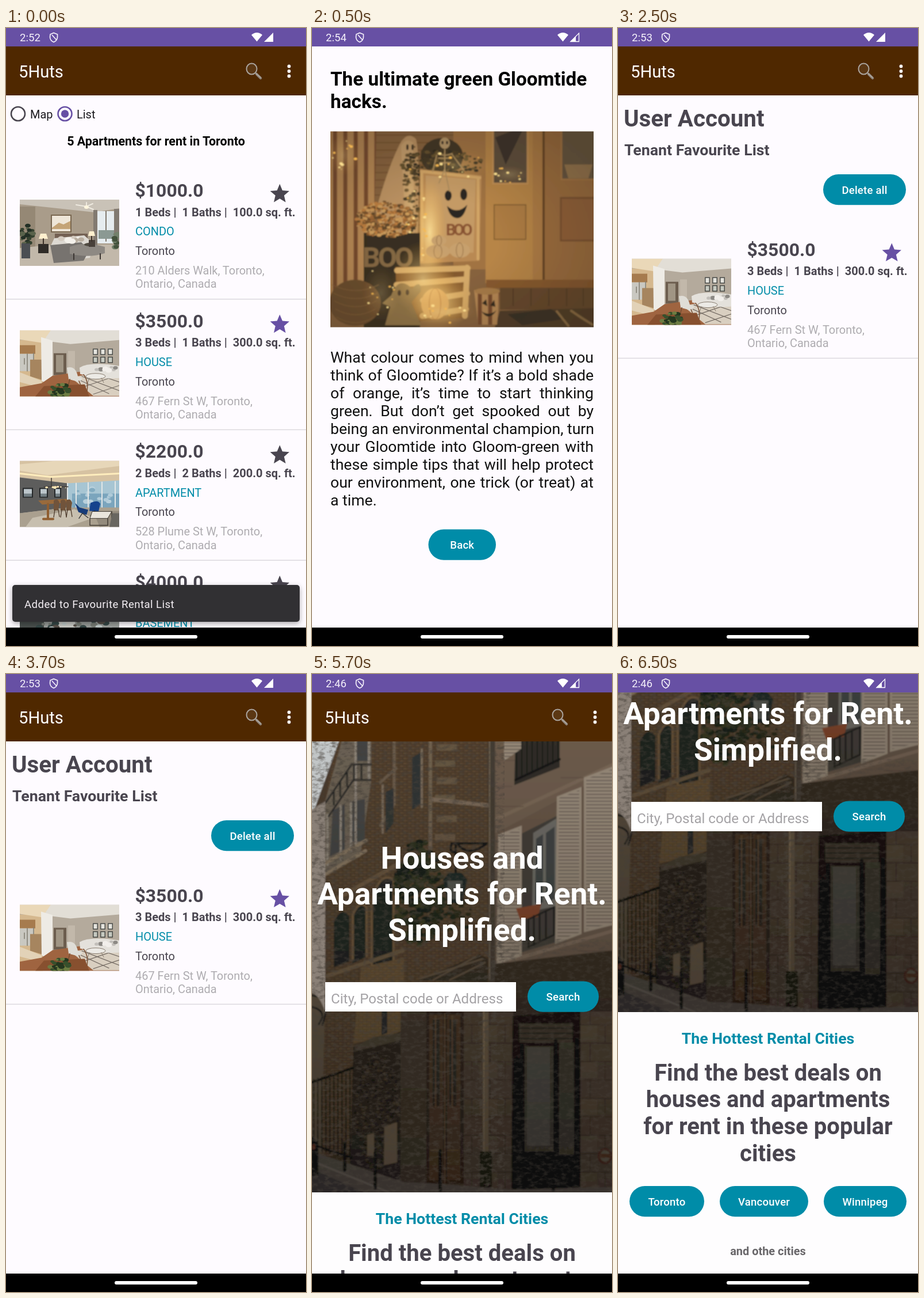
Write an HTML page that moves like this. It is 522 by 1073 pixels and loops after 8000 ms.

```html
<!DOCTYPE html>
<html lang="en">
<head>
<meta charset="utf-8">
<title>Rental app tour</title>
<style>
html, body { margin: 0; width: 100%; height: 100%; overflow: hidden; background: #fefbff; }
svg { display: block; }
#stage { width: 100vw; height: 100vh; }
text, p { font-family: Roboto, sans-serif; white-space: pre; }
p { margin: 0; font-size: 26.6px; line-height: 31px; color: #111; }
p span { display: block; white-space: nowrap; text-align-last: justify; }
p span:last-child { text-align-last: left; }
</style>
</head>
<body>
<svg id="stage" viewBox="0 0 522 1073">
  <defs>
    <pattern id="brick" width="14" height="9" patternUnits="userSpaceOnUse">
      <rect width="14" height="9" fill="#66503a"/>
      <path d="M0 .5h14M0 5h14M4 0v5M11 5v4" stroke="#503d2a"/>
      <path d="M5 2.5h5M0 7h4" stroke="#775e41" stroke-width="2"/>
    </pattern>
    <pattern id="stone" width="58" height="64" patternUnits="userSpaceOnUse">
      <rect width="58" height="64" fill="#5c4d3e"/>
      <path d="M2 34h30v28H2z" fill="#665644"/>
      <path d="M0 1h58M0 33h58M20 0v33M46 33v31" stroke="#46392e" stroke-width="1.5"/>
    </pattern>
    <pattern id="slat" width="8" height="6" patternUnits="userSpaceOnUse">
      <rect width="8" height="6" fill="#b8a894"/>
      <path d="M0 5h8" stroke="#83756a" stroke-width="2"/>
    </pattern>
    <pattern id="stripe" width="18" height="8" patternUnits="userSpaceOnUse">
      <rect width="18" height="8" fill="#b58754"/>
      <path d="M4 0v8" stroke="#75492d" stroke-width="7"/>
    </pattern>
    <linearGradient id="shade" x2="0" y2="1">
      <stop offset="0" stop-color="#0c0907" stop-opacity=".2"/>
      <stop offset=".5" stop-color="#0c0907" stop-opacity=".34"/>
      <stop offset="1" stop-color="#0c0907" stop-opacity=".55"/>
    </linearGradient>
    <radialGradient id="dusk" cx=".42" cy=".55" r=".7">
      <stop offset=".3" stop-color="#3a2a1a" stop-opacity="0"/>
      <stop offset="1" stop-color="#3a2a1a" stop-opacity=".35"/>
    </radialGradient>
    <radialGradient id="glow">
      <stop offset="0" stop-color="#ffe49a" stop-opacity=".85"/>
      <stop offset="1" stop-color="#f2b050" stop-opacity="0"/>
    </radialGradient>
    <filter id="soft"><feGaussianBlur stdDeviation=".8"/></filter>
    <filter id="grain">
      <feTurbulence type="fractalNoise" baseFrequency=".09 .16" numOctaves="3" seed="4"/>
      <feColorMatrix values="0 0 0 0 .06  0 0 0 0 .05  0 0 0 0 .04  3 0 0 0 -1.3"/>
    </filter>
  </defs>
</svg>
<script>
const INK = '#49454f', TEAL = '#008ca8', PURPLE = '#6750a4', PAPER = '#fefbff';

const rect = (x, y, w, h, fill, more = '') =>
  `<rect x="${x}" y="${y}" width="${w}" height="${h}" fill="${fill}" ${more}/>`;
const path = (d, fill, more = '') => `<path d="${d}" fill="${fill}" ${more}/>`;
const line = (d, stroke, width = 2) =>
  path(d, 'none', `stroke="${stroke}" stroke-width="${width}" stroke-linecap="round"`);
const oval = (x, y, rx, ry, fill, more = '') =>
  `<ellipse cx="${x}" cy="${y}" rx="${rx}" ry="${ry}" fill="${fill}" ${more}/>`;
const text = (x, y, size, str, fill = INK, more = '') =>
  `<text x="${x}" y="${y}" font-size="${size}" fill="${fill}" ${more}>${str}</text>`;
const bold = (x, y, size, str, fill, more = '') =>
  text(x, y, size, str, fill, 'font-weight="700" ' + more);
const centred = (y, size, str, fill) => bold(261, y, size, str, fill, 'text-anchor="middle"');
const button = (x, y, w, label) => rect(x, y, w, 53.2, TEAL, 'rx="26.6"') +
  text(x + w / 2, y + 33.7, 18.6, label, '#fff',
    'font-weight="500" text-anchor="middle" letter-spacing=".2"');
const photo = (x, y, w, h, body, box = `0 0 ${w} ${h}`) =>
  `<svg x="${x}" y="${y}" width="${w}" height="${h}" viewBox="${box}">${body}</svg>`;
const soft = body => `<g filter="url(#soft)">${body}</g>`;

let seed = 11;
const rnd = () => (seed = seed * 16807 % 2147483647) / 2147483647;

// Scatter n blobs over an elliptical patch
function scatter(n, x, y, w, h, size, colours) {
  let out = '';
  for (let i = 0; i < n; i++) {
    const a = rnd() * 6.283, d = Math.sqrt(rnd()), s = size * (.5 + rnd());
    out += oval((x + w * d * Math.cos(a)).toFixed(1), (y + h * d * Math.sin(a)).toFixed(1),
      s.toFixed(1), (s * .7).toFixed(1), colours[i % colours.length]);
  }
  return out;
}

const bedroom = rect(0, 0, 173, 115, '#a99c8a') +
  path('M0 0H173V15L130 22 0 8z', '#c9c2b7') + rect(0, 12, 27, 72, '#958875') +
  path('M0 84 60 78H173V115H0z', '#c2b8aa') +
  rect(134, 20, 33, 56, '#e6ecef') + line('M134 20V78M150 20V72M167 18V80', '#81786e') +
  rect(137, 53, 28, 15, '#8b9993') + path('M128 18h7v62h-7zM164 16h9v66h-9z', '#827a71') +
  line('M98 9 116 12 127 7M116 5V12L128 17', '#eee9df') + oval(116, 13, 4, 3, '#fff6de') +
  rect(54, 26, 36, 31, '#796750') + rect(56, 28, 32, 27, '#eee6d8') +
  path('M56 49 68 40 76 43 88 37V51H56z', '#c4a477') +
  rect(61, 59, 57, 25, '#746153') + path('M60 67 112 62 128 76 122 101 64 108 53 82z', '#ddd9d2') +
  path('M53 79 107 74 121 88 111 106 59 110z', '#77736f') +
  scatter(7, 87, 68, 22, 5, 6, ['#f4f1eb', '#b9aea0', '#d3cabf']) +
  path('M87 82q25-10 61 0v11q-26 9-61 1z', '#8e8983') + line('M94 94v10M140 94v9', '#3b3531') +
  oval(121, 78, 9, 3, '#514b42') + rect(32, 77, 18, 16, '#302c28') + rect(120, 70, 11, 12, '#48403a') +
  path('M36 59h10l3 9H33z', '#fff0cf') + line('M41 68v10M125 63v9', '#3b3028') +
  path('M121 55h8l2 8h-12z', '#fff0cf') +
  scatter(30, 10, 61, 13, 17, 4, ['#34412f', '#59624b', '#222f25']) +
  rect(3, 76, 15, 26, '#4b4e52') + scatter(12, 168, 70, 6, 17, 4, ['#43523c', '#73806b']);

const living = rect(0, 0, 173, 115, '#b4aa9c') + path('M0 0H173V17L88 24 0 13z', '#e2ded6') +
  rect(0, 17, 40, 98, '#d5b88e') + path('M0 0h54L39 22 0 16z', '#ead8b8') +
  rect(0, 26, 27, 15, '#a67b4e') + rect(0, 41, 25, 30, '#c9c8c1') +
  line('M13 41v30M8 49v10M24 40v38', '#807c71', 1.5) +
  path('M18 51h20v35L18 80z', '#a6855f') + path('M0 73 38 88v12L0 90z', '#e2d2b7') +
  path('M37 12 57 18V97L38 88z', '#eeebe5') + rect(59, 40, 22, 38, '#6c5d4e') +
  rect(63, 43, 13, 30, '#a09584') + rect(84, 36, 12, 38, '#c2b8aa') +
  path('M57 79 105 72 173 79V115H0V99L38 92z', '#9f6440') +
  path('M89 82 139 73 173 77V114H128z', '#d9cfc0') +
  line('M94 82 155 110M108 80 173 105M129 75 173 90M109 99 171 78M128 111 173 96', '#746b63', 1.2) +
  path('M104 65q18-11 69-3v21q-34 3-68-7z', '#e4e1db') +
  scatter(9, 149, 67, 24, 4, 4, ['#8c8984', '#c2bfba', '#f2efeb']) +
  [127, 140, 153].map(x => rect(x, 32, 9, 11, '#4a4c49') + rect(x + 1.5, 33.5, 6, 8, '#e5e4de') +
    rect(x, 46, 9, 11, '#484945') + rect(x + 1.5, 47.5, 6, 8, '#c5c9c0')).join('') +
  oval(132, 80, 17, 5, '#eceae5', 'stroke="#887d70"') + line('M121 83l-3 9M142 83l4 8', '#887d70', 1) +
  path('M82 65q15-4 19 15l8 3-5 7-19-5z', '#dfddd6') + line('M87 85l-5 21M103 88l7 18M111 77q10 13 5 33', '#754d32', 1.5) +
  path('M42 97 113 94 121 115H27z', '#87502f') +
  scatter(34, 70, 106, 17, 12, 4, ['#37502c', '#6c7c42', '#24371f']);

const loft = rect(0, 0, 173, 115, '#b8ad9b') + path('M0 0H173V36L87 40 0 28z', '#d6c2a2') +
  path('M0 6 63 0H173V9L48 25 0 17z', '#e7d7b9') + line('M0 22 54 28 173 22', '#ffedbd', 3) +
  path('M0 29 83 39V81L0 91z', '#5d5d5c') +
  [5, 34, 60].map((x, i) => rect(x, 47, 18 - i * 3, 17, '#25282a') +
    rect(x + 2, 49, 14 - i * 3, 13, '#bcc6cb') + rect(x + 2, 57, 14 - i * 3, 5, '#737f84')).join('') +
  path('M82 39 173 34V85H82z', '#a7c5d3') + rect(91, 57, 82, 27, '#7ba5bd') +
  scatter(17, 129, 62, 37, 15, 4, ['#b0cbd9', '#82abc0', '#b8d0dc']) +
  line('M83 39v46M98 39v46M119 38v47M143 37v48M166 36v50', '#e2e6e6') +
  path('M0 91 82 81H173V115H0z', '#aaa08f') + path('M22 99 95 84 128 99 82 115H10z', '#c7bfaf') +
  line('M55 30v14M42 45h42', '#403b36', 1.5) + scatter(9, 63, 46, 20, 2, 2, ['#ffe6b4']) +
  path('M32 69 81 66 88 72 39 76z', '#996a3c') + line('M49 75v25M41 101h17', '#8f5e31', 4) +
  [59, 71, 81].map(x => path(`M${x} 69q7-5 10 4l-2 13h-8z`, '#71543b') +
    line(`M${x + 2} 85l-2 13M${x + 8} 85l2 12`, '#4c3a2c', 1.3)).join('') +
  path('M96 73 104 81 119 85 116 94 102 89z', '#163b78') + path('M123 73q14-6 17 2l-3 13-16-1z', '#15438d') +
  line('M109 91l-6 9M109 91l10 8M130 87l-7 9M130 87l9 9', '#333', 1.3) +
  path('M128 88 173 87V111L139 115z', '#938a7c') + path('M126 88H160L153 100H122z', '#e9e5dc', 'stroke="#433d35"') +
  line('M122 100v12h31v-12M160 88v11', '#433d35', 1.5) + path('M161 91h12v24h-17z', '#696660');

const basement = rect(0, 0, 173, 115, '#989c99') + rect(0, 48, 42, 67, '#494f4d') +
  rect(57, 45, 39, 67, '#c8c9c4') + scatter(26, 90, 59, 80, 11, 5, ['#354746', '#bec8c7', '#777c75', '#57504a']);

const porch = soft(rect(20, 170, 480, 360, '#86623d') +
  [...Array(18)].map((_, i) => rect(108, 185 + i * 13, 200, 2, '#75522f')).join('') +
  path('M20 170 112 179 106 438 20 476z', 'url(#stripe)') +
  rect(246, 170, 62, 249, '#a17342') + rect(302, 170, 82, 273, '#b78547') +
  rect(384, 170, 17, 278, '#ad7b44') + rect(401, 170, 4, 274, '#664426') + rect(405, 170, 95, 271, '#9c6d3e') +
  rect(315, 170, 60, 100, '#5b4c3b', 'stroke="#c18f55" stroke-width="3"') +
  path('M319 190 370 170 337 237z', '#372f29') + rect(317, 307, 55, 60, '#ad7c43', 'stroke="#86602f" stroke-width="2"') +
  rect(434, 170, 70, 93, '#655540', 'stroke="#a87845" stroke-width="3"') +
  path('M439 237h49l-7 24h-35z', '#96774f') + rect(433, 295, 70, 74, '#926139', 'stroke="#79502e" stroke-width="3"') +
  path('M303 437 500 437V452H303z', '#87592e') + rect(327, 451, 173, 38, '#65482c') +
  [350, 381, 412, 443, 472].map(x => line(`M${x} 453v29`, '#533a24')).join('') +
  path('M327 491 500 486V530H315z', '#4f3c28') + path('M340 497 416 488 441 505 366 516z', '#362e25') +
  line('M451 491q20 14 37 24M426 492l20 25', '#8f7045', 4) +
  path('M111 318Q132 242 153 201Q166 178 181 193Q188 220 184 358L128 377z', '#ba9161') +
  path('M155 205q8-16 21-6l2 157-15-3z', '#cda773', 'opacity=".6"') + oval(166, 207, 2, 5, '#3b2e22') + oval(175, 207, 2, 5, '#3b2e22') +
  oval(226, 223, 37, 32, '#3d3324') +
  scatter(150, 227, 237, 70, 26, 3, ['#443923', '#62502e', '#2f2c20']) +
  scatter(110, 173, 283, 14, 82, 3, ['#423724', '#66502e']) +
  path('M188 245 295 256 291 404 188 409z', '#b98953') + path('M198 256 285 263 281 390 197 394z', '#c49a65') +
  line('M191 250v153M289 261v140M190 249 292 260', '#d2a566', 5) + oval(205, 355, 28, 95, 'url(#glow)') +
  oval(237, 291, 6, 9, '#292621') + oval(264, 289, 6, 10, '#292621') +
  path('M235 309Q253 325 270 307Q264 332 251 330Q239 328 235 309z', '#292621') +
  text(233, 360, 27, 'BOO', '#885333', 'font-weight="700" letter-spacing="-4"') +
  oval(231, 200, 9, 10, '#b59669') + oval(227, 199, 2, 3, '#40352a') + oval(235, 199, 2, 3, '#40352a') +
  line('M231 211v34M219 218q12 6 25 0M220 226h22M222 234h19M217 221l-7 28M244 220l20 27M231 245l8 38M231 245l-10 24', '#a98a5d', 2) +
  [[219, 388, 21, 12], [257, 386, 18, 13], [221, 369, 13, 9]].map(([x, y, w, h]) =>
    oval(x, y, w, h, '#c7a06d') + oval(x, y, w / 3, h, 'none', 'stroke="#8d6841"')).join('') +
  rect(90, 356, 98, 175, '#382e20') +
  scatter(420, 128, 333, 53, 31, 3, ['#b97c3f', '#77522d', '#c9995a', '#9d6735', '#5f4629']) +
  text(88, 415, 48, 'BOO', '#836743', 'font-family="serif" font-weight="700" letter-spacing="-4"') +
  path('M145 415 274 412 270 503 150 511z', '#83592d') +
  line('M148 421 271 417M147 446 269 436M193 473 270 461M192 500 268 488M270 416 266 500', '#d3a868', 10) +
  oval(216, 475, 64, 52, 'url(#glow)') + oval(214, 479, 24, 27, '#e7b368') + oval(214, 479, 10, 27, 'none', 'stroke="#b77e40"') +
  path('M138 464q12-35 36-12 17-17 15 6l-16 18 17 40h-63l9-32-14-6z', '#917548') +
  oval(152, 460, 3, 5, '#44372a') + oval(166, 459, 3, 5, '#44372a') +
  path('M282 455h45l-5 60h-33z', 'url(#stripe)') + oval(305, 457, 22, 6, '#a67a47') +
  path('M296 478l7-7 2 12zM310 482l7-10 2 12zM295 492q14 9 26-2-13 21-26 2z', '#33291f') +
  oval(75, 477, 45, 40, '#6a4c2d') +
  [0, 1, 2, 3, 4].map(i => line(`M${35 + i * 2} ${446 + i * 14}Q76 ${466 + i * 14} ${116 - i * 2} ${446 + i * 14}`, '#84623a', 1)).join('') +
  rect(20, 170, 480, 360, 'url(#dusk)') +
  [[55, 221, 22, 35], [172, 295, 10, 65], [194, 348, 5, 65], [224, 493, 48, 20], [250, 239, 48, 27], [343, 254, 25, 15], [120, 460, 25, 50]]
    .map(([x, y, w, h]) => oval(x, y, w * 1.3, h, 'url(#glow)', 'opacity=".25"') +
      scatter(11, x, y, w, h, 2, ['#ffe292', '#f6b953'])).join('') +
  oval(193, 435, 55, 65, 'url(#glow)', 'opacity=".65"'));

const street = soft(rect(-9, 108, 540, 801, '#594634') +
  path('M45 108H306V530L158 640H20V232z', 'url(#brick)') +
  path('M54 108H103V186L84 317 45 334 20 349 23 221z', '#827666') +
  path('M77 108H100V151H77zM70 221 92 217V291H69zM36 237 57 226V304L31 317z', '#505252') +
  line('M76 108V301M99 108V184M68 223V307M50 229V322M27 245V331', '#aaa092', 4) +
  line('M21 349 93 307M22 329 94 289', '#a08d73', 6) +
  line('M24 223 69 157H103M29 247 72 184H102M38 202v25M49 187v25M61 170v25M73 158v27M86 157v27', '#292a28', 3) +
  line('M119 188 146 164M143 117V226L119 263', '#82705a', 5) + path('M174 145 190 136V225L174 236zM128 205 142 198V259L128 276z', '#383d3d') +
  line('M191 131V231M123 193V276', '#91806b', 4) +
  [122, 150, 180, 210, 246, 278].map((y, i) => rect(217 - i % 2 * 3, y, 35, 11, '#7c6951')).join('') +
  line('M206 108V304', '#88765f', 6) + line('M210 218 306 228', '#94806a', 7) +
  path('M105 395q13-52 36-35v145l-37 20zM72 415q10-25 22-12v88l-24 12zM38 430q14-28 27-9v78l-27 10z', '#282b2a') +
  line('M104 510V393q15-53 38-35v142M71 495v-77q12-28 24-12v84', '#846947', 4) +
  line('M45 389 148 331M27 524 158 480', '#80694c', 7) + path('M86 509 160 493V620L72 642z', '#997b4b') +
  path('M86 509 160 493V620L72 642z', 'url(#brick)', 'opacity=".55"') + path('M121 582l10-4v45l-10 4z', '#343634') +
  path('M318 108H531V524H318z', '#796655') + path('M318 108H531V165L318 277z', '#836f5c') +
  line('M318 253 531 154M318 505 531 444', '#917c68', 6) +
  line('M318 150h38M318 195h30M433 180h89M463 481h59M318 230h50', '#665444', 1) +
  path('M354 108h77v54l-79 31z', '#393630') + line('M354 184 431 148', '#191b1a', 4) +
  [...Array(9)].map((_, i) => line(`M${356 + i * 9} 108V${184 - i * 4}`, '#1c1e1d')).join('') +
  path('M365 277 427 246V465L365 483z', '#4f4a43') + path('M385 276 425 251V403L383 412z', '#828078') +
  path('M390 286 402 278V397H388zM407 276 422 265V390L407 396z', '#4c5150') +
  path('M326 280 363 266V488L323 502zM428 214 467 199V450L425 466zM475 181 531 160V432L475 446z', 'url(#slat)', 'stroke="#b6a692" stroke-width="4"') +
  path('M334 108 364 108V130L334 151z', 'url(#slat)') + path('M355 407 399 399 393 422 362 426z', '#9a5232') +
  line('M376 426 421 405V453L377 474zM386 420v48M396 416v48M407 411v46', '#252622', 3) +
  scatter(260, 187, 381, 42, 92, 6, ['#273020', '#343b25', '#1c251a', '#41442a']) +
  scatter(50, 245, 421, 35, 30, 4, ['#252b1d', '#35351f']) +
  line('M304 294H243Q238 309 247 309M254 296q17 22 48 0M250 298v49', '#171c1b', 4) +
  path('M228 357 238 345h22l10 12-8 41h-26z', '#27302f') + path('M235 359h27l-5 32h-17z', '#656962') +
  line('M313 108V530', '#51483c', 11) + line('M309 108V530', '#8b7b65') +
  path('M184 532 291 487 306 494V535z', '#3e352a') + line('M188 529 296 495M211 531 285 491M240 531 301 501', '#75634d', 3) +
  path('M318 503 531 479V595H318z', '#40352b') + rect(-9, 586, 81, 284, '#4b3c2b') +
  path('M-9 552q23 0 31 38v260H-9z', '#756651') + path('M22 586H72V820L16 846z', 'url(#brick)') +
  path('M72 647 158 620V882L66 865z', '#332b20') + path('M73 647 108 630 160 622V635L76 655z', '#554b3c') +
  scatter(420, 114, 758, 39, 103, 2.2, ['#453a2b', '#29251c', '#544631', '#231f19']) +
  path('M126 786l22-8v70l-23 5zM96 800l12-3v39l-12 1z', '#8a765c') +
  rect(154, 586, 45, 300, '#4d4334') + rect(199, 586, 67, 299, '#392a1d') +
  path('M204 591h24v288h-24zM235 591h23v288h-23z', '#59432d') +
  path('M210 600h12v150h-12zM239 600h12v150h-12z', '#363229') +
  line('M231 590v293M244 594v158M215 594v158M207 827h17M237 827h18', '#755a3d', 2) +
  rect(264, 586, 86, 308, 'url(#stone)') + rect(466, 586, 65, 314, 'url(#stone)') +
  path('M349 594 467 584V895H347z', '#161713') + rect(361, 607, 92, 33, '#4a4436') +
  line('M361 615h92M361 624h92M361 633h92', '#2c2a22') +
  path('M370 646h50v183h-50zM430 640h26v194h-26z', '#484639') + rect(374, 648, 40, 171, '#5c5b53') +
  line('M424 637V889M365 645V885M461 635V893', '#0f110f', 6) +
  line('M302 586V830', '#806d53', 10) + line('M299 586V830', '#a48e6e') + rect(292, 829, 21, 66, '#1b1c1b') +
  path('M-9 826 160 882 205 884 350 895 531 890V909H-9z', '#6a635b') + path('M-9 855 110 909H-9z', '#4f4c49') +
  line('M-9 842 134 900', '#8d857a', 3) +
  line('M-9 712 71 684M-9 814 69 840', '#141714', 4) +
  [...Array(10)].map((_, i) => line(`M${3 + i * 7} ${704 - i * 2}V${824 + i * 2}`, '#171a16', 2)).join('') +
  line('M0 558q35 4 18 51M0 578q28 7 12 30', '#191d1a', 3) +
  line('M57 815V862M110 832V892M223 828V896M420 844V895', '#171a1a', 6) +
  path('M-9 800q19 5 20 22v49H-9z', '#171a1c') + oval(3, 821, 3, 5, '#843b2c') +
  oval(510, 837, 13, 14, '#5b3025') + oval(510, 837, 9, 10, '#77705e') + rect(500, 833, 20, 7, '#663a2c') +
  rect(-9, 108, 540, 801, 'url(#shade)') +
  path('M-9 108H50L0 247H-9z', '#c2c6c7') + path('M-9 240 23 221V590Q14 552-9 552z', '#8a8077')) +
  rect(24, 117, 282, 783, '#000', 'filter="url(#grain)" opacity=".55"') +
  rect(306, 500, 216, 400, '#000', 'filter="url(#grain)" opacity=".4"');

const star = (y, fill) =>
  path('M12 17.27 18.18 21l-1.64-7.03L22 9.24l-7.19-.61L12 2 9.19 8.63 2 9.24l5.46 4.73L5.82 21z', fill,
    `transform="translate(456.3 ${y}) scale(1.667)"`);

// One rental row, y measured from the first row of the list
const card = (y, room, price, beds, baths, area, kind, road, fav) => `<g transform="translate(0 ${y})">` +
  photo(24, 298, 173, 115, room) + bold(224.5, 293, 31.9, `$${price}.0`) +
  bold(225, 326.7, 20, `${beds} Beds |  ${baths} Baths |  ${area}.0 sq. ft.`) +
  text(225, 360.3, 19.94, kind, TEAL) + text(225, 394, 19.94, 'Toronto') +
  text(225, 428, 19.94, `${road}, Toronto,`, '#aeacb0') + text(225, 451.2, 19.94, 'Ontario, Canada', '#aeacb0') +
  star(267.5, fav ? PURPLE : INK) + rect(0, 470, 522, 1.5, '#dcd9de') + '</g>';
const house = y => card(y, living, 3500, 3, 1, 300, 'HOUSE', '467 Fern St W', true);

const header = rect(0, 31, 522, 86, '#4f2800') + text(22, 86, 29.2, '5Huts', '#fff') +
  line('M436 80 443 87', '#8d8379', 4.5) + line('M435 79 443 86', '#b5ada4', 1.5) +
  oval(427.5, 71, 9, 9.5, '#5b3713', 'stroke="#aaa49e" stroke-width="2"') +
  [66.5, 75, 83.5].map(y => oval(492.5, y, 2.9, 2.9, '#fff')).join('');

const frame = (time, weak) => rect(0, 0, 522, 32, PURPLE) + text(24, 23.2, 18.6, time, '#f4f0fa') +
  path('M77 11 83 8.5 89.5 11v5q-.5 6-6.5 8.500-6-2.500-6.500-8.500zM80 12l8 9', 'none', 'stroke="#f4f0fa" stroke-width="1.7"') +
  path('M427 12q9.5-8 19 0L436.5 23.5z', '#fff') +
  (weak ? path('M464.5 9V23.5H450z', 'none', 'stroke="#fff" stroke-width="1.3"') + path('M449 24 459 14V24z', '#fff')
    : path('M449 24 465 8V24z', '#fff')) +
  rect(0, 1041, 522, 32, '#000') + rect(189, 1054, 144, 6, '#fff', 'rx="3"');

const list = rect(0, 0, 522, 1073, PAPER) +
  oval(21, 149, 12, 12, 'none', `stroke="${INK}" stroke-width="2.6"`) + text(42, 156.5, 19.94, 'Map', '#1c1b1f') +
  oval(102.5, 149, 12, 12, 'none', `stroke="${PURPLE}" stroke-width="2.6"`) + oval(102.5, 149, 6.7, 6.7, PURPLE) +
  text(123, 156.5, 19.94, 'List', '#1c1b1f') + centred(203.7, 21.45, '5 Apartments for rent in Toronto', '#000') +
  card(0, bedroom, 1000, 1, 1, 100, 'CONDO', '210 Alders Walk', false) + house(226.7) +
  card(453.4, loft, 2200, 2, 2, 200, 'APARTMENT', '528 Plume St W', false) +
  card(680, basement, 4000, 4, 2, 400, 'BASEMENT', '', false) +
  rect(11, 967, 500, 64, '#313033', 'rx="5" style="filter:drop-shadow(0 3px 5px #0005)"') +
  text(32, 1006.5, 18.6, 'Added to Favourite Rental List', '#f4eff4', 'letter-spacing=".46"') +
  header + frame('2:52');

const story = ['What colour comes to mind when you', 'think of Gloomtide? If it’s a bold shade',
  'of orange, it’s time to start thinking', 'green. But don’t get spooked out by',
  'being an environmental champion, turn', 'your Gloomtide into Gloom-green with',
  'these simple tips that will help protect', 'our environment, one trick (or treat) at', 'a time.'];
const article = rect(0, 0, 522, 1073, PAPER) +
  bold(32, 99.5, 33.35, 'The ultimate green Gloomtide', '#000') + bold(32, 138.5, 33.35, 'hacks.', '#000') +
  photo(32, 179.5, 458, 340, porch, '32 179.5 458 340') +
  `<foreignObject x="32" y="556" width="458" height="290"><p>${story.map(s => `<span>${s}</span>`).join('')}</p></foreignObject>` +
  button(202.5, 870.5, 117.5, 'Back') + frame('2:54', true);

const account = rect(0, 0, 522, 1073, PAPER) + bold(10, 170.5, 40.3, 'User Account') +
  bold(11, 220.5, 26.7, 'Tenant Favourite List') + button(357, 254, 144, 'Delete all') +
  house(102.6) + header + frame('2:53');

const home = scroll => rect(0, 0, 522, 1073, '#fefdfe') + `<g transform="translate(0 ${-scroll})">` +
  photo(0, 117, 522, 783, street, '0 117 522 783') +
  ['Houses and', 'Apartments for Rent.', 'Simplified.'].map((s, i) => centred(338 + i * 62.3, 53.3, s, '#fff')).join('') +
  rect(23, 535, 332, 51, '#fff') + text(33, 571.5, 24.1, 'City, Postal code or Address', '#a5a3a6') +
  button(375, 533.5, 124, 'Search') + centred(955, 26.7, 'The Hottest Rental Cities', TEAL) +
  ['Find the best deals on', 'houses and apartments', 'for rent in these popular', 'cities']
    .map((s, i) => centred(1018.5 + i * 46.8, 40.1, s)).join('') +
  button(20, 1202, 130, 'Toronto') + button(177, 1202, 154, 'Vancouver') + button(358, 1202, 144, 'Winnipeg') +
  centred(1321.5, 19.94, 'and othe cities', '#69676a') + '</g>' + (scroll ? '' : header) + frame('2:46', true);

const stage = document.getElementById('stage');
const ends = [500, 2500, 4500, 6500, 8000];
const screens = [list, article, account, home(0), home(313)].map(body => {
  const g = document.createElementNS('http://www.w3.org/2000/svg', 'g');
  g.innerHTML = body;
  return stage.appendChild(g);
});

function draw(now) {
  const t = now % 8000, current = ends.findIndex(end => t < end);
  screens.forEach((g, i) => { g.style.display = i === current ? '' : 'none'; });
  requestAnimationFrame(draw);
}
draw(performance.now());
</script>
</body>
</html>
```
